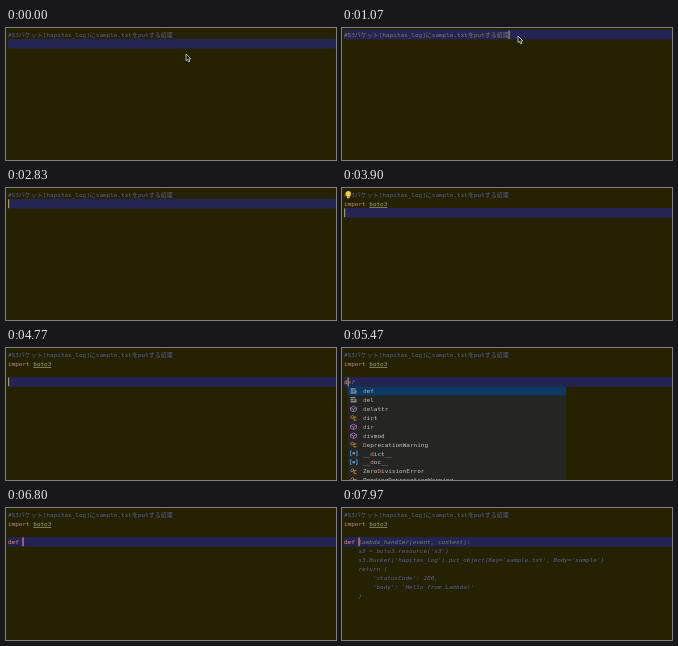
Animation of 330x132 px, one loop 8000 ms. Source, as an HTML page with a canvas:

```html
<!DOCTYPE html>
<html lang="ja">
<head>
<meta charset="utf-8">
<style>
  html, body { margin: 0; width: 100%; height: 100%; overflow: hidden; background: #242200; }
  canvas { display: block; width: 330px; height: 132px; }
</style>
</head>
<body>
<canvas id="stage"></canvas>
<script>
const W = 330, H = 132, LOOP = 8000;
const LEFT = 2, LINE = 9.05, CHAR = 3.612;
const FONT = '"DejaVu Sans Mono", "Noto Sans Mono CJK JP", "Noto Sans CJK JP", "Noto Sans CJK", monospace';
const COLOR = {
  back: '#242200', active: '#252555', comment: '#5e5e92', dim: '#7a7a68',
  keyword: '#d08c84', name: '#a6a68c', popup: '#252524', selected: '#0c3a62',
  item: '#c4c4c0', match: '#d8906c', blue: '#68a8d8', purple: '#a878c0', orange: '#d89030'
};
const COMMENT = '#S3バケット[hapitas_log]にsample.txtをputする処理';
const SUGGESTION = [
  'lambda_handler(event, context):',
  "    s3 = boto3.resource('s3')",
  "    s3.Bucket('hapitas_log').put_object(Key='sample.txt', Body='sample')",
  '    return {',
  "        'statusCode': 200,",
  "        'body': 'Hello from Lambda!'",
  '    }'
];
const ITEMS = [
  ['def', 'keyword'], ['del', 'keyword'], ['delattr', 'func'], ['dict', 'class'],
  ['dir', 'func'], ['divmod', 'func'], ['DeprecationWarning', 'class'],
  ['__dict__', 'variable'], ['__doc__', 'variable'], ['ZeroDivisionError', 'class'],
  ['PendingDeprecationWarning', 'class']
];

// Editing events, in ms.
const T = {
  click: 570, enter1: 1770, ghost1: 2870, tab: 3170, bulbOn: 3400, enter2: 3870,
  bulbOff: 4100, enter3: 4770, d: 5030, popup: 5200, e: 5600, f: 5700, space: 5800, ghost2: 7830
};
const KEYS = [0, T.click, 870, T.enter1, T.tab, T.enter2, T.enter3, T.d, T.e, T.f, T.space];

const canvas = document.getElementById('stage');
const ctx = canvas.getContext('2d');
const ratio = window.devicePixelRatio || 1;
canvas.width = W * ratio;
canvas.height = H * ratio;

const lineTop = n => 2 + (n - 1) * LINE;

function rect(x, y, w, h, color) {
  ctx.fillStyle = color;
  ctx.fillRect(x, y, w, h);
}

function stroke(points, color, width = 0.8) {
  ctx.beginPath();
  points.forEach(([x, y]) => ctx.lineTo(x, y));
  ctx.strokeStyle = color;
  ctx.lineWidth = width;
  ctx.stroke();
}

// A large font scaled down keeps fractional character widths.
function text(str, x, baseline, color, style = '') {
  ctx.save();
  ctx.translate(x, baseline);
  ctx.scale(0.1, 0.1);
  ctx.font = `${style} 60px ${FONT}`;
  ctx.fillStyle = color;
  ctx.fillText(str, 0, 0);
  ctx.restore();
}

const code = (str, line, column, color, style) =>
  text(str, LEFT + column * CHAR, lineTop(line) + 7, color, style);

function drawImport(ghost) {
  if (ghost) return code('import boto3', 2, 0, COLOR.dim, 'italic');
  code('import', 2, 0, COLOR.keyword);
  code('boto3', 2, 7, COLOR.name);
  rect(LEFT + 7 * CHAR, lineTop(2) + 7.9, 5 * CHAR, 0.7, COLOR.name);
}

function drawBulb() {
  ctx.fillStyle = '#f0d040';
  ctx.beginPath();
  ctx.arc(6.3, 5.8, 2.7, 0, Math.PI * 2);
  ctx.fill();
  rect(5, 8, 2.6, 2.3, '#c8b878');
}

function drawIcon(kind, x, y) {
  if (kind === 'keyword') {
    [[0, 5], [2, 3], [4, 6]].forEach(([dy, w]) => rect(x, y + dy, w, 0.9, COLOR.item));
    rect(x + 4, y + 2, 2, 1.2, COLOR.item);
  } else if (kind === 'func') {
    stroke([[x, y + 1.5], [x + 3, y], [x + 6, y + 1.5], [x + 6, y + 4], [x + 3, y + 5.5], [x, y + 4], [x, y + 1.5], [x + 3, y + 3], [x + 6, y + 1.5]], COLOR.purple);
    stroke([[x + 3, y + 3], [x + 3, y + 5.5]], COLOR.purple);
  } else if (kind === 'class') {
    stroke([[x, y + 2], [x + 2, y], [x + 3.5, y + 1.5], [x + 1.5, y + 3.5], [x, y + 2]], COLOR.orange);
    stroke([[x + 3, y + 2], [x + 6, y + 2]], COLOR.orange);
    stroke([[x + 3.5, y + 2], [x + 3.5, y + 5], [x + 6, y + 5]], COLOR.orange);
  } else {
    stroke([[x + 1, y], [x, y], [x, y + 5], [x + 1, y + 5]], COLOR.blue);
    stroke([[x + 5.5, y], [x + 6.5, y], [x + 6.5, y + 5], [x + 5.5, y + 5]], COLOR.blue);
    rect(x + 2, y + 1.5, 2.5, 2, COLOR.blue);
  }
}

function drawPopup(prefix) {
  const x = 5.5, top = 38.5, row = 8.9;
  const shown = ITEMS.filter(([label]) => label.toLowerCase().includes(prefix));
  rect(x, top, 218.5, shown.length * row + 1, COLOR.popup);
  rect(x, top, 218.5, row, COLOR.selected);
  shown.forEach(([label, kind], i) => {
    const y = top + i * row;
    const at = label.toLowerCase().indexOf(prefix);
    const end = at + prefix.length;
    drawIcon(kind, 8.5, y + 2);
    text(label.slice(0, at), 21, y + 6.7, COLOR.item);
    text(label.slice(at, end), 21 + at * CHAR, y + 6.7, COLOR.match);
    text(label.slice(end), 21 + end * CHAR, y + 6.7, COLOR.item);
  });
}

function drawPointer(t) {
  const p = Math.min(1, Math.max(0, (t - 30) / 470));
  const ease = p * p * (3 - 2 * p);
  const drift = Math.min(1, Math.max(0, (t - 870) / 200));
  const x = 180 - ease - 3 * drift, y = 26 - 18 * ease;
  ctx.beginPath();
  [[0, 0], [0, 6.6], [1.5, 5.3], [2.6, 7.8], [3.8, 7.3], [2.8, 4.9], [4.8, 4.8]]
    .forEach(([dx, dy]) => ctx.lineTo(x + dx, y + dy));
  ctx.closePath();
  ctx.fillStyle = '#101010';
  ctx.fill();
  ctx.strokeStyle = '#d8d8d8';
  ctx.lineWidth = 0.8;
  ctx.stroke();
}

function drawCaret(t, line, typed) {
  const lastKey = KEYS.filter(k => k <= t).pop();
  if (t < T.click || Math.floor((t - lastKey) / 500) % 2) return;
  if (line === 1 && t >= 1370) return;
  const x = line === 1 ? 166.5
    : LEFT + CHAR * (line === 2 && t >= T.tab ? 12 : typed.length);
  rect(x, lineTop(line) + 0.3, 1.2, 8.8, t >= T.space ? '#f08078' : '#98986c');
}

function draw(t) {
  ctx.setTransform(ratio, 0, 0, ratio, 0, 0);
  rect(0, 0, W, H, COLOR.back);

  const line = t < T.click ? 2 : t < T.enter1 ? 1 : t < T.enter2 ? 2 : t < T.enter3 ? 3 : 4;
  const typed = t < T.d ? '' : t < T.e ? 'd' : t < T.f ? 'de' : t < T.space ? 'def' : 'def ';
  rect(LEFT, lineTop(line), W - LEFT, 9.4, COLOR.active);

  code(COMMENT, 1, 0, line === 1 ? COLOR.dim : COLOR.comment);
  if (t >= T.ghost1) drawImport(t < T.tab);
  if (t >= T.bulbOn && t < T.bulbOff) drawBulb();

  code(typed, 4, 0, COLOR.keyword);
  if (t >= T.popup && t < T.space) {
    code('def'.slice(typed.length), 4, typed.length, COLOR.dim, 'italic');
    drawPopup(typed);
  }
  if (t >= T.ghost2) {
    SUGGESTION.forEach((str, i) =>
      code(str, 4 + i, i ? 0 : 4, i ? COLOR.comment : COLOR.dim, 'italic'));
  }
  drawCaret(t, line, typed);
  if (t < T.enter1) drawPointer(t);
}

const start = performance.now();
function tick() {
  draw((performance.now() - start) % LOOP);
  requestAnimationFrame(tick);
}
tick();
</script>
</body>
</html>
```
